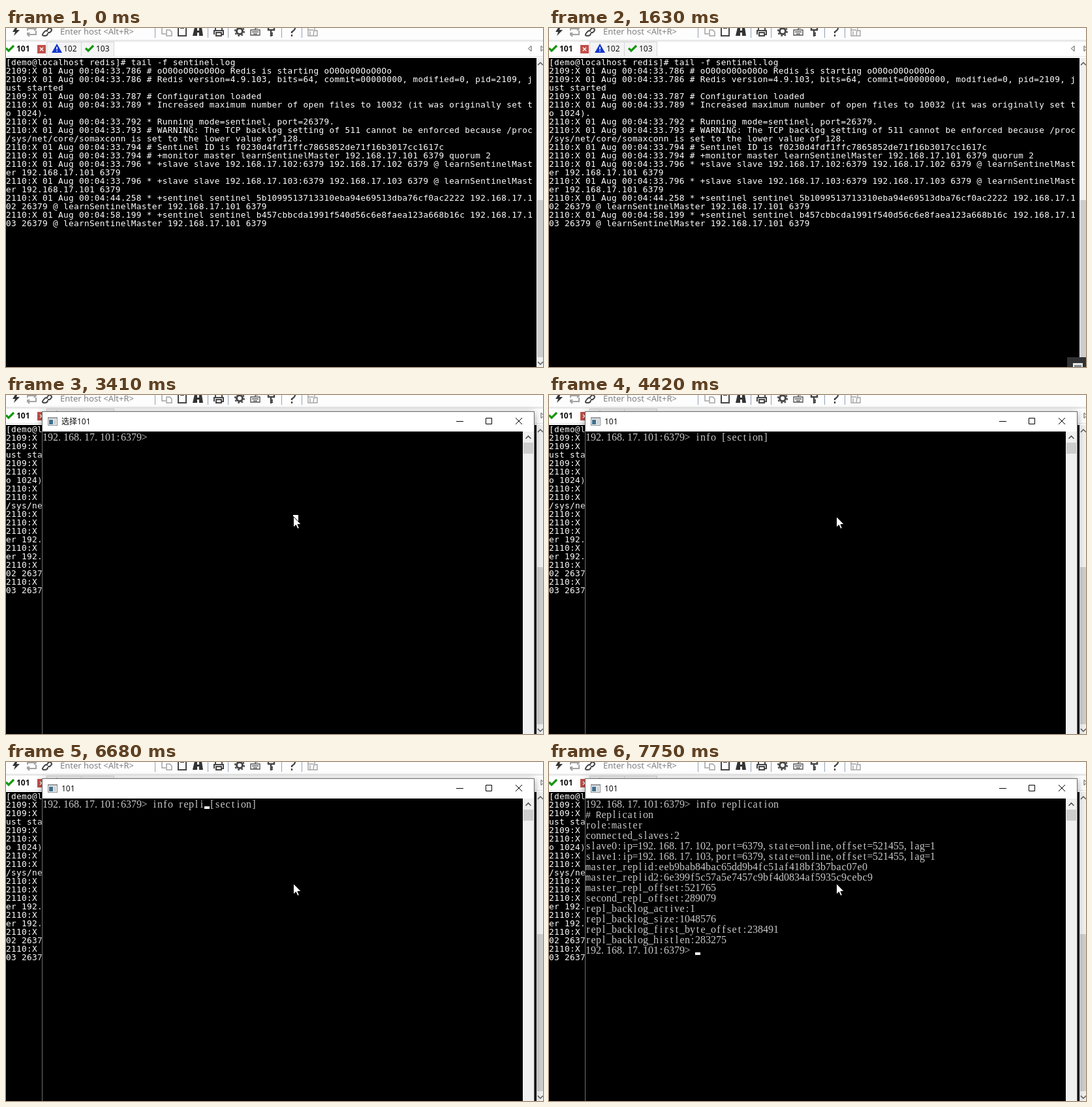
Animation, 823 px wide and 520 px high, one loop 8000 ms. Source, as an HTML page:

```html
<!DOCTYPE html>
<html lang="en">
<head>
<meta charset="utf-8">
<title>Sentinel log and replication info</title>
<style>
html, body { margin: 0; width: 100%; height: 100%; overflow: hidden; background: #fff; }
svg { display: block; width: 100%; height: 100%; }
text { white-space: pre; }
.ui { font-family: "Noto Sans", "Noto Sans CJK SC", "Noto Sans CJK", sans-serif; font-size: 12px; fill: #111; }
.log { font: 12.7px "DejaVu Sans Mono", monospace; letter-spacing: .354px; fill: #fff; }
.con { font: 16px "Liberation Serif", serif; fill: #c8c8c8; text-anchor: middle; }
.con .wide { font: 14px "Liberation Mono", monospace; }
.ico { fill: none; stroke: #444; stroke-width: 2; }
.pale { stroke: #a2a2a2; }
.thin { fill: none; stroke: #000; stroke-width: 1; }
</style>
</head>
<body>
<svg viewBox="0 0 823 520" preserveAspectRatio="none">
  <defs>
    <filter id="shade" x="-10%" y="-10%" width="120%" height="120%">
      <feDropShadow dx="0" dy="2" stdDeviation="6" flood-color="#000" flood-opacity=".4"/>
    </filter>
  </defs>

  <!-- toolbar -->
  <rect width="823" height="520" fill="#fff"/>
  <rect width="823" height="18" fill="#fdfdfd"/>
  <rect y="18" width="823" height="3" fill="#e9e9e9"/>
  <path d="M15-2 10 6h4l-2 6 9-9h-5l2-5z" fill="#333"/>
  <g class="ico">
    <path class="pale" d="M33 4V1h12M33 7v3h13V4M43-2l3 3-3 3M36 7l-3 3 3 3"/>
    <path d="M63 3l2-2q2-2 4 0t0 4l-2 2h-3M64 5l-2-1q-2 0-5 4t2 4 5-4"/>
    <path class="pale" d="M244-1h-5v10h6M246 3h5l3 3v6h-8z" stroke-width="1.5"/>
    <path d="M264-1v13h12V-1M267 0h6"/>
    <path d="M321 3v-4h10v4M319 10V4h14v6h-3M322 7h8v5h-8z"/>
    <circle cx="358" cy="5" r="4.5" stroke-width="3"/>
    <circle cx="358" cy="5" r="7" stroke-dasharray="2.75 2.75"/>
    <path d="M375 3h14v8h-14zM377 6h10M379 9h6M382 3V0h4" stroke-width="1.4" stroke="#555"/>
    <path d="M402-1v4h9v-4M406 3v10M406 8h3M406 11h3" stroke-width="2.4"/>
    <path d="M434 0q1-3 5-3t4 3-5 6v2M438 10v3" stroke-width="2.3"/>
    <path class="pale" d="M463-1v13h7M463 3h8M473-1v4M472 4h5v8h-6zM466 5v6" stroke-width="1.4"/>
  </g>
  <path d="M289-1h4v5h3v-5h4l2 13h-6V7h-3v5h-7z" fill="#333"/>
  <path d="M228.500 0v15M309.500 0v15M340.500 0v15M422.500 0v15M453.500 0v15" stroke="#91a0b4"/>
  <text class="ui" x="83" y="9.500" style="font-size:13px;fill:#808080">Enter host &lt;Alt+R&gt;</text>

  <!-- session tabs -->
  <rect x="62" y="21" width="104" height="22" fill="#f4f4f4"/>
  <path d="M0 43.500h823" stroke="#e2e2e2"/>
  <path d="M62.500 21v22M115.500 21v22M165.500 21v22M62 21.500h104" stroke="#d6d6d6"/>
  <g fill="none" stroke="#15960f" stroke-width="3.200">
    <path d="M0 31l4 4 8-8"/>
    <path d="M122 31l4 4 8-8"/>
  </g>
  <rect x="48" y="26" width="13" height="13" fill="#c2504a"/>
  <path d="M52 30l5 5M57 30l-5 5" stroke="#fff" stroke-width="1.300"/>
  <path d="M78 24l8 14H70z" fill="#1537cf"/>
  <path d="M78 29v4M78 34.500v1.500" stroke="#fff" stroke-width="1.600"/>
  <g class="ui">
    <text x="16" y="36" font-weight="700">101</text>
    <text x="88" y="36">102</text>
    <text x="138" y="36">103</text>
  </g>
  <path class="thin" d="M805 27.500v8l-4.500-4zM820 27.500v8l4.500-4z" style="stroke:#555"/>

  <!-- log terminal -->
  <rect y="46" width="813" height="474" fill="#000"/>
  <rect x="813" y="46" width="10" height="474" fill="#f0f0f0"/>
  <rect x="814" y="264" width="9" height="241" fill="#cdcdcd"/>
  <path d="M815 57l4-4 4 4M815 512l4 4 4-4" fill="none" stroke="#555" stroke-width="1.500"/>
  <g id="log" class="log"></g>

  <path id="beam" d="M-3-8h2.500M.500-8H3M0-7.500v15M-3 8h2.500M.500 8H3" stroke="#fff" fill="none"/>
  <g id="corner">
    <rect x="794" y="505" width="29" height="15" fill="#303234"/>
    <rect x="803" y="514" width="15" height="6" fill="#e8e8e8"/>
    <rect x="805" y="517" width="11" height="3" fill="#7d868c"/>
  </g>

  <!-- console window -->
  <g id="win">
    <rect x="55" y="25" width="755" height="520" fill="#6e6e6e" filter="url(#shade)"/>
    <rect x="56" y="26" width="753" height="30" fill="#fff"/>
    <rect x="56" y="56" width="736" height="464" fill="#000"/>
    <rect x="792" y="56" width="17" height="464" fill="#f0f0f0"/>
    <rect x="793" y="73" width="15" height="17" fill="#cdcdcd"/>
    <path d="M796.500 67l4-4 4 4" fill="none" stroke="#505050" stroke-width="1.600"/>
    <rect x="64.500" y="34.500" width="14" height="12" fill="#f4f4f4" stroke="#8b8f94"/>
    <rect x="65" y="35" width="13" height="2" fill="#b8bcc0"/>
    <rect x="66" y="38" width="6" height="7" fill="#3f6f8d"/>
    <rect x="73" y="38" width="4" height="7" fill="#cfd4d8"/>
    <text id="title" class="ui" x="85" y="45"></text>
    <path class="thin" d="M690 40.500h11M735.500 35.500h9v9h-9zM781 35l10 10M791 35l-10 10"/>
    <g id="con" class="con"></g>
    <rect id="mark" y="184" width="8" height="16" fill="#fff"/>
    <rect id="caret" width="8" height="4" fill="#fff"/>
    <path id="arrow" d="M0 0v16.500l3.800-3.600 2.600 5.900 2.500-1.100-2.500-5.700h5.300z" fill="#fff" stroke="#000"/>
  </g>
</svg>
<script>
const LOOP = 8000, COLS = 101, CELL = 8, ROW = 16, LEFT = 56, TOP = 56;
const $ = id => document.getElementById(id);
const show = (el, on) => el.setAttribute('display', on ? 'inline' : 'none');
const move = (el, x, y) => el.setAttribute('transform', `translate(${x} ${y})`);
const esc = s => s.replace(/&/g, '&amp;').replace(/</g, '&lt;').replace(/>/g, '&gt;');

const log = `[demo@localhost redis]# tail -f sentinel.log
2109:X 01 Aug 00:04:33.786 # oO0OoO0OoO0Oo Redis is starting oO0OoO0OoO0Oo
2109:X 01 Aug 00:04:33.786 # Redis version=4.9.103, bits=64, commit=00000000, modified=0, pid=2109, just started
2109:X 01 Aug 00:04:33.787 # Configuration loaded
2110:X 01 Aug 00:04:33.789 * Increased maximum number of open files to 10032 (it was originally set to 1024).
2110:X 01 Aug 00:04:33.792 * Running mode=sentinel, port=26379.
2110:X 01 Aug 00:04:33.793 # WARNING: The TCP backlog setting of 511 cannot be enforced because /proc/sys/net/core/somaxconn is set to the lower value of 128.
2110:X 01 Aug 00:04:33.794 # Sentinel ID is f0230d4fdf1ffc7865852de71f16b3017cc1617c
2110:X 01 Aug 00:04:33.794 # +monitor master learnSentinelMaster 192.168.17.101 6379 quorum 2
2110:X 01 Aug 00:04:33.796 * +slave slave 192.168.17.102:6379 192.168.17.102 6379 @ learnSentinelMaster 192.168.17.101 6379
2110:X 01 Aug 00:04:33.796 * +slave slave 192.168.17.103:6379 192.168.17.103 6379 @ learnSentinelMaster 192.168.17.101 6379
2110:X 01 Aug 00:04:44.258 * +sentinel sentinel 5b1099513713310eba94e69513dba76cf0ac2222 192.168.17.102 26379 @ learnSentinelMaster 192.168.17.101 6379
2110:X 01 Aug 00:04:58.199 * +sentinel sentinel b457cbbcda1991f540d56c6e8faea123a668b16c 192.168.17.103 26379 @ learnSentinelMaster 192.168.17.101 6379`;

const prompt = '192.168.17.101:6379> ';
const reply = `# Replication
role:master
connected_slaves:2
slave0:ip=192.168.17.102,port=6379,state=online,offset=521455,lag=1
slave1:ip=192.168.17.103,port=6379,state=online,offset=521455,lag=1
master_replid:eeb9bab84bac65dd9b4fc51af418bf3b7bac07e0
master_replid2:6e399f5c57a5e7457c9bf4d0834af5935c9cebc9
master_repl_offset:521765
second_repl_offset:289079
repl_backlog_active:1
repl_backlog_size:1048576
repl_backlog_first_byte_offset:238491
repl_backlog_histlen:283275`.split('\n');

// Event times in ms
const OPEN = 2320, PICK = 3100, UNPICK = 3940, HINT = 4420, ENTER = 7750;
const command = 'info replication';
const keys = [[4030, 2], [4190, 3], [4340, 4], [5730, 5], [6050, 6], [6140, 7], [6290, 8],
  [6520, 9], [6680, 10], [6740, 11], [6830, 12], [7060, 13], [7140, 14], [7290, 15], [7370, 16]];
const blinks = [2870, 3410, 3940, 4420, 4950, 5500, 5730, 6050, 6600, 7060, 7600];
const arrowPath = [[2630, 609, 311], [2710, 542, 261], [2790, 488, 222], [2870, 454, 197], [2950, 440.5, 186.5]];
const beamPath = [[700, 755.5, 489.5], [777, 760.5, 493.5], [853, 764.5, 497.5]];

const last = (list, t) => list.filter(e => e[0] <= t).pop();

// Wrap the log at the terminal width
const wrapped = log.split('\n').flatMap(s => s.match(new RegExp(`.{1,${COLS}}`, 'g')));
$('log').innerHTML = wrapped.map((s, i) => `<text x="0" y="${57 + 13 * i}">${esc(s)}</text>`).join('');

// One glyph per console cell
function consoleLine(s, row) {
  const spans = [...s].map((c, i) => {
    const x = LEFT + CELL * (i + .5) - (/[.,]/.test(c) ? 2 : 0);
    return `<tspan x="${x}"${/[mwR#]/.test(c) ? ' class="wide"' : ''}>${esc(c)}</tspan>`;
  });
  return `<text y="${TOP + ROW * row + 14}">${spans.join('')}</text>`;
}

let drawn = '';
function setConsole(lines) {
  const id = lines.join('\n');
  if (id === drawn) return;
  drawn = id;
  $('con').innerHTML = lines.map(consoleLine).join('');
}

function drawConsole(t) {
  const typed = command.slice(0, (last(keys, t) || [0, 0])[1]);
  const done = t >= ENTER;
  const hint = t >= HINT && !done ? (typed.endsWith(' ') ? '' : ' ') + '[section]' : '';
  const first = prompt + typed + hint;
  setConsole(done ? [first, ...reply, prompt] : [first]);

  const col = prompt.length + (done ? 0 : typed.length);
  const row = done ? reply.length + 1 : 0;
  move($('caret'), LEFT + CELL * col, TOP + ROW * row + 12);
  show($('caret'), blinks.filter(b => b <= t).length % 2);

  const picking = t < UNPICK;
  $('title').textContent = (picking ? '选择' : '') + '101';
  show($('mark'), picking);
  $('mark').setAttribute('x', t < PICK ? 256 : 440);

  const at = last(arrowPath, t);
  show($('arrow'), at);
  if (at) move($('arrow'), at[1], at[2]);
}

function render(t) {
  const beam = t < 930 && last(beamPath, t);
  show($('beam'), beam);
  if (beam) move($('beam'), beam[1], beam[2]);
  show($('corner'), t >= 1630 && t < OPEN);
  show($('win'), t >= OPEN);
  if (t >= OPEN) drawConsole(t);
}

const start = performance.now();
function tick() {
  render((performance.now() - start) % LOOP);
  requestAnimationFrame(tick);
}
tick();
</script>
</body>
</html>
```
